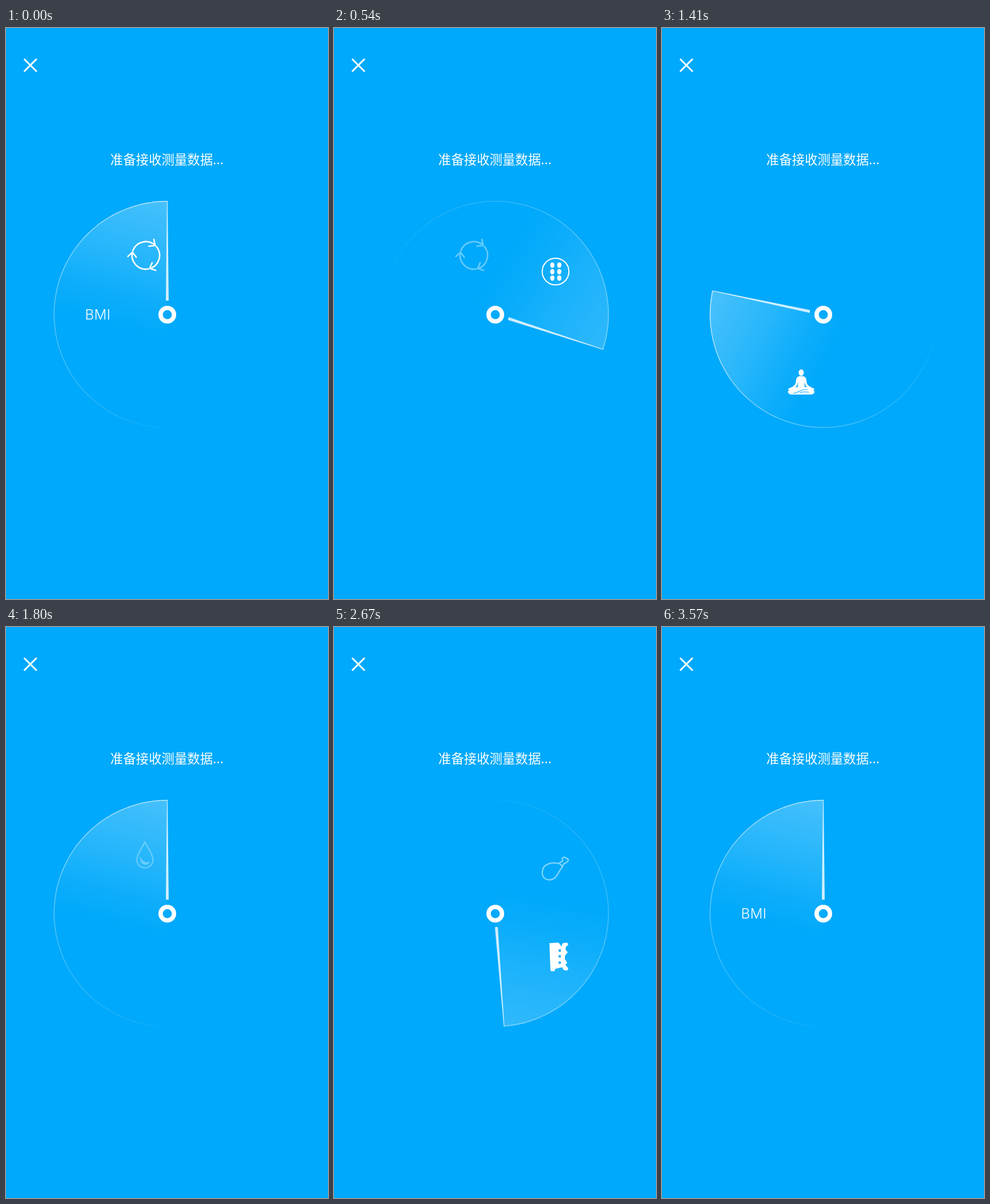
These frames come from a looping animation (562 by 997 pixels, 3.6 s). An HTML page:

```html
<!DOCTYPE html>
<html lang="zh">
<head>
<meta charset="utf-8">
<style>
html, body { margin: 0; width: 100%; height: 100%; overflow: hidden; background: #00a9fb; }
svg { display: block; width: 100vw; height: 100vh; }
.line { fill: none; stroke: #fff; stroke-width: 2; stroke-linejoin: round; stroke-linecap: round; }
.solid { fill: #fff; }
.title { font: 400 22.4px "Noto Sans CJK SC", "Noto Sans CJK", sans-serif; }
.bmi { font: 300 24px Inter, sans-serif; letter-spacing: .4px; }
</style>
</head>
<body>
<svg viewBox="0 0 562 997">
  <defs>
    <linearGradient id="glow" gradientUnits="userSpaceOnUse" x1="0" y1="-198" x2="-60" y2="35">
      <stop offset="0" stop-color="#fff" stop-opacity=".29"/>
      <stop offset=".2" stop-color="#fff" stop-opacity=".23"/>
      <stop offset=".45" stop-color="#fff" stop-opacity=".16"/>
      <stop offset=".75" stop-color="#fff" stop-opacity=".055"/>
      <stop offset="1" stop-color="#fff" stop-opacity="0"/>
    </linearGradient>
    <g id="arrow">
      <path class="line" style="stroke-width:2.6" d="M-22.6 -8.2A24 24 0 0 1 16.4 -17.5M14 -28L16.4 -17.3L5.5 -16"/>
    </g>
    <path id="lobe" class="line" d="M-2.2 -4C-2.7 -10 -4 -15 -7.2 -14.5C-14 -12 -20.7 1 -20.7 13C-20.7 19 -18.5 19.5 -14.5 17.5C-8.5 15 -2.2 11 -2.2 3Z"/>
  </defs>
  <rect width="562" height="997" fill="#00a9fb"/>
  <path d="M31.5 54L53.5 76M53.5 54L31.5 76" stroke="#fff" stroke-width="3"/>
  <text class="title solid" x="182" y="238.3">准备接收测量数据...</text>

  <g transform="translate(281.5 500)">
    <g id="sweep">
      <g id="trail">
        <path d="M0 0V-197.5A197.5 197.5 0 0 0 0 197.5Z" fill="url(#glow)"/>
        <g id="rim" fill="none" stroke="#fff" stroke-width="1.5"/>
      </g>
      <path d="M-2.5 -24H2.5L.5 -198H-.5Z" fill="#fff" opacity=".8"/>
    </g>
    <circle cy=".5" r="11.7" fill="none" stroke="#fff" stroke-width="7.6"/>
  </g>

  <g class="icon" data-beat="0" transform="translate(244 397)">
    <use href="#arrow"/>
    <use href="#arrow" transform="rotate(120)"/>
    <use href="#arrow" transform="rotate(240)"/>
  </g>

  <g class="icon" data-beat="1" id="cells">
    <circle class="line" cx="386.7" cy="425.2" r="23.3"/>
  </g>

  <g class="icon" data-beat="2" transform="translate(391.7 575)">
    <use href="#lobe"/>
    <use href="#lobe" transform="scale(-1 1)"/>
    <path class="line" style="stroke-width:3.6" d="M0 -19.5V-7"/>
    <path class="line" d="M-2.5 -4L0 -7L2.5 -4"/>
  </g>

  <g class="icon" data-beat="3" transform="translate(243 618)">
    <ellipse class="solid" cy="-16.3" rx="4.5" ry="5.6"/>
    <path class="solid" d="M-3 -10H3C8 -9 9 -6 9.3 0C10 5 13 8 22 11.5C24 13 22 14.5 19 13.5C12 12 8 9 6.5 3L5.5 0L6 9C12 9 19 12 23 16C24 20 20 22 15 22H-15C-20 22 -24 20 -23 16C-19 12 -12 9 -6 9L-5.5 0L-6.5 3C-8 9 -12 12 -19 13.5C-22 14.5 -24 13 -22 11.5C-13 8 -10 5 -9.3 0C-9 -6 -8 -9 -3 -10Z"/>
    <path d="M-14 20C-6 20 -4 13 11 13M-3 19C3 16 8 17 13 18" fill="none" stroke="#14aefb" stroke-width="1.1"/>
  </g>

  <g class="icon" data-beat="5">
    <path class="line" style="stroke-width:2.3" d="M242.4 375C239 384 228.4 396 228.4 406.5A14 14 0 0 0 256.5 406.5C256.5 396 246 384 242.4 375Z"/>
    <path class="solid" d="M234.5 400C232 409 238 416 244 415.5C248 415 250.5 412.5 251.5 410C245 412.5 236.5 409 234.5 400Z"/>
  </g>

  <g class="icon" data-beat="6">
    <path class="line" style="stroke-width:2.3" d="M391.5 413C382 410.5 363.5 412 363.5 429C363.5 437 369 441.5 376 441.5C389 441.5 391 427 399 418.5L393 412.3L399.3 408.7C396 402.5 402.5 399.5 405 404C410 403.2 410 410.5 405.3 410.8C404.5 413.8 402.5 413 402 412.4L398.7 417.5"/>
  </g>

  <path class="icon solid" data-beat="7" fill-rule="evenodd" d="M376 552L392 551L397 558L399 552L407 551L409 555L405 558L404 563L408 568L403 574V580L407 586L404 590L409 596L407 600L401 599L398 594L386 597L385 601H378L377 580ZM392 563h4v4h-4zM392 573h4v4h-4zM392 584h4v4h-4z"/>

  <path class="icon line" data-beat="8" d="M214.5 605Q215 600 222 600Q228 601 227.3 604L227 612L238 621Q238 613 242 610Q248 606.5 254 607.5Q257 612 257.2 618Q257 628 252 636L249.5 641.5Q246 645 240.5 642Q232 633 227 625L217 610.5Q214.5 608 214.5 605Z"/>

  <text class="icon bmi solid" data-beat="9" x="138" y="509.3">BMI</text>
</svg>
<script>
const LOOP = 3600, STEP = 30, BEAT = 360, R = 197.5;
const NS = "http://www.w3.org/2000/svg";
const byId = id => document.getElementById(id);
const icons = [...document.querySelectorAll(".icon")];
const clamp = v => Math.max(0, Math.min(1, v));

function add(parent, tag, attrs) {
  const el = document.createElementNS(NS, tag);
  for (const k in attrs) el.setAttribute(k, attrs[k]);
  parent.append(el);
}

function rimPoint(deg) {
  const a = deg * Math.PI / 180;
  return `${(-R * Math.sin(a)).toFixed(2)} ${(-R * Math.cos(a)).toFixed(2)}`;
}

// The rim fades with the angle behind the needle.
for (let d = 0; d < 195; d += 3) {
  add(byId("rim"), "path", {
    d: `M${rimPoint(d)}A${R} ${R} 0 0 0 ${rimPoint(d + 3)}`,
    opacity: (0.75 * (1 - d / 195) ** 1.2).toFixed(3)
  });
}

for (const x of [381, 393.2])
  for (const y of [414, 425.5, 436.7])
    add(byId("cells"), "ellipse", { cx: x, cy: y, rx: 3.7, ry: 4.8, fill: "#fff" });

// The second turn runs slightly faster towards its end.
function needleAngle(t) {
  if (t < 2220) return t * 0.2;
  if (t < 3090) return 444 + (t - 2220) * 177 / 870;
  return Math.min(720, 621 + (t - 3090) * 99 / 480);
}

function iconOpacity(t, beat) {
  const age = (t - beat * BEAT + LOOP) % LOOP;
  const rise = beat ? clamp((age + 15) / 50) : 1;
  return Math.min(rise, clamp((655 - age) / 290));
}

function draw(ms) {
  const t = Math.floor((ms % LOOP) / STEP) * STEP;
  const angle = needleAngle(t);
  byId("sweep").setAttribute("transform", `rotate(${angle})`);
  byId("trail").setAttribute("opacity", 0.82 + 0.2 * Math.cos((angle + 50) * Math.PI / 180));
  for (const el of icons) el.setAttribute("opacity", iconOpacity(t, +el.dataset.beat));
}

let start;
function tick(now) {
  start ??= now;
  draw(now - start);
  requestAnimationFrame(tick);
}
draw(0);
requestAnimationFrame(tick);
</script>
</body>
</html>
```
